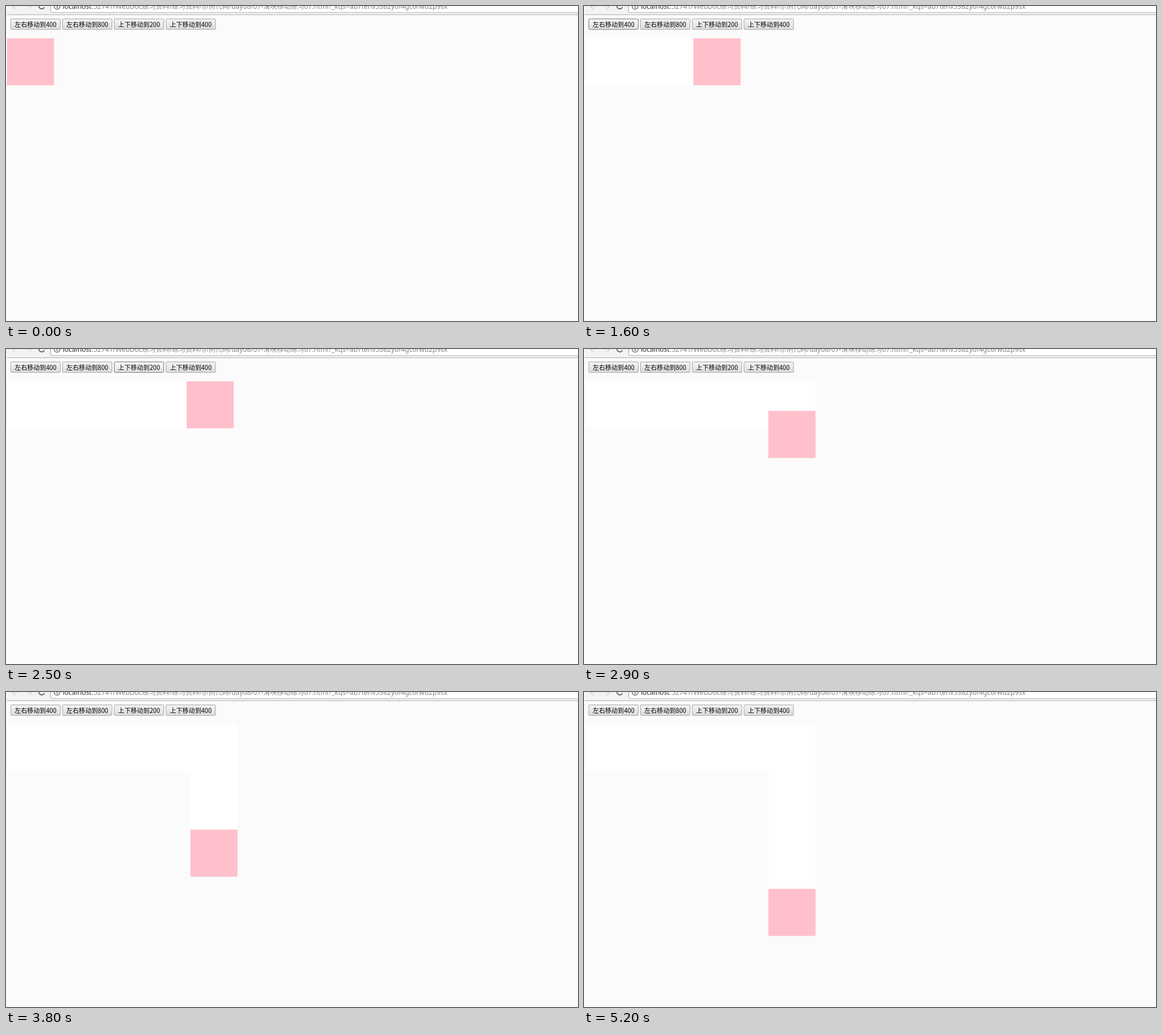
Recreate the animation shown at these times as an HTML page. Size 1007 px wide and 556 px high, loop 5.5 s.

```html
<!DOCTYPE html>
<html lang="zh">
<head>
<meta charset="utf-8">
<style>
  html, body { margin: 0; width: 100%; height: 100%; overflow: hidden; background: #fbfbfb; }
  svg { display: block; width: 1007px; height: 556px; }
  text { white-space: pre; }
  .address { font: 12px 'Noto Sans', 'Noto Sans CJK SC', 'Noto Sans CJK', sans-serif; fill: #858585; }
  .label { font: 11.07px 'Noto Sans CJK SC', 'Noto Sans CJK', 'Noto Sans', sans-serif; text-anchor: middle; }
  .button rect { fill: url(#normal); stroke: #a6a6a6; }
  .button.hover rect { fill: url(#hover); stroke: #777; }
  .button.pressed rect { fill: url(#pressed); stroke: #858585; }
</style>
</head>
<body>
<svg viewBox="0 0 1007 556">
  <defs>
    <linearGradient id="normal" x2="0" y2="1"><stop stop-color="#f3f3f3"/><stop offset=".4" stop-color="#ececec"/><stop offset="1" stop-color="#dadada"/></linearGradient>
    <linearGradient id="hover" x2="0" y2="1"><stop stop-color="#f6f6f6"/><stop offset=".4" stop-color="#f0f0f0"/><stop offset="1" stop-color="#dedede"/></linearGradient>
    <linearGradient id="pressed" x2="0" y2="1"><stop stop-color="#d8d8d8"/><stop offset=".4" stop-color="#ebebeb"/><stop offset="1" stop-color="#f4f4f4"/></linearGradient>
  </defs>

  <!-- browser toolbar -->
  <rect x="1.5" width="1005.5" height="15" fill="#f3f3f3"/>
  <path d="M1.5 15.3H1007" stroke="#aaa"/>
  <path d="M78.5 -3V9.5Q78.5 11.3 80.5 11.3H1007" fill="none" stroke="#a8a8a8"/>
  <path d="M80 -1H1007V10.8H80Z" fill="#fff"/>
  <g fill="none" stroke="#d2d2d2" stroke-width="1.5">
    <path d="M22 0H11M11 0L16 5.5"/>
    <path d="M34 0H45.500M45.500 0L40.500 5.500"/>
  </g>
  <path d="M58 0A5 5 0 0 0 67.600 2" fill="none" stroke="#555" stroke-width="1.6"/>
  <circle cx="90" cy="0.500" r="5.200" fill="none" stroke="#555" stroke-width="1.2"/>
  <path d="M90 0V3.500" stroke="#555" stroke-width="1.400"/>
  <text class="address" x="100" y="4.500"><tspan fill="#333">localhost</tspan>:52741/WebDoc练习资料/练习资料/示例代码/day08/07-滑块移动练习07.html?_kqs=ab7tenv5382yof4gc6rwu2p9sx</text>

  <g id="buttons"></g>
  <rect id="trailAcross" x="1.7" y="57" height="83" fill="#fff"/>
  <rect id="trailDown" y="57" width="83" fill="#fff"/>
  <rect id="box" width="83" height="83" fill="#ffc0cb"/>
</svg>
<script>
const LOOP = 5500, FRAME = 100, TICK = 46.9;
const SCALE = 0.83, LEFT = 1.7, TOP = 15.5, SIZE = 83;
const $ = id => document.getElementById(id);

const labels = ['左右移动到400', '左右移动到800', '上下移动到200', '上下移动到400'];
$('buttons').innerHTML = labels.map((label, i) => {
  const x = 8.5 + i * 91.1;
  return `<g class="button"><rect x="${x}" y="22.800" width="87" height="18.500" rx="1"/>
    <text class="label" x="${x + 43.5}" y="36.700">${label}</text></g>`;
}).join('');
const buttons = document.querySelectorAll('.button');

// pointer states: start, end, button index, state
const pointer = [
  [600, 900, 1, 'hover'],
  [900, 1100, 0, 'hover'], [1100, 1300, 0, 'pressed'], [1300, 1800, 0, 'hover'],
  [1900, 2300, 1, 'hover'],
  [2500, 2600, 2, 'hover'], [2600, 2700, 2, 'pressed'], [2700, 2900, 2, 'hover'],
  [3000, 3500, 3, 'hover'], [3500, 3600, 3, 'pressed'], [3600, 3800, 3, 'hover']
];

// each tick covers a tenth of the remaining distance, rounded up
function glide(from, target, elapsed, maxTicks = Infinity) {
  const ticks = Math.min(maxTicks, Math.floor(elapsed / TICK));
  let value = from;
  for (let i = 0; i < ticks && value < target; i++) value += Math.ceil((target - value) / 10);
  return value;
}

function set(id, attributes) {
  for (const name in attributes) $(id).setAttribute(name, attributes[name]);
}

function draw(time) {
  const t = Math.floor(time % LOOP / FRAME) * FRAME;
  const left = glide(0, 400, t - 1192, 31);
  const middle = glide(50, 200, t - 2648, 19);
  const top = glide(middle, 400, t - 3554);
  const x = LEFT + left * SCALE, y = TOP + top * SCALE;

  set('box', { x, y });
  set('trailAcross', { width: x + SIZE - LEFT });
  set('trailDown', { x, height: y + SIZE - 57 });

  const active = pointer.find(([start, end]) => t >= start && t < end);
  buttons.forEach((button, i) => {
    button.setAttribute('class', active && active[2] === i ? `button ${active[3]}` : 'button');
  });
}

function loop() {
  draw(performance.now());
  requestAnimationFrame(loop);
}
loop();
</script>
</body>
</html>
```
